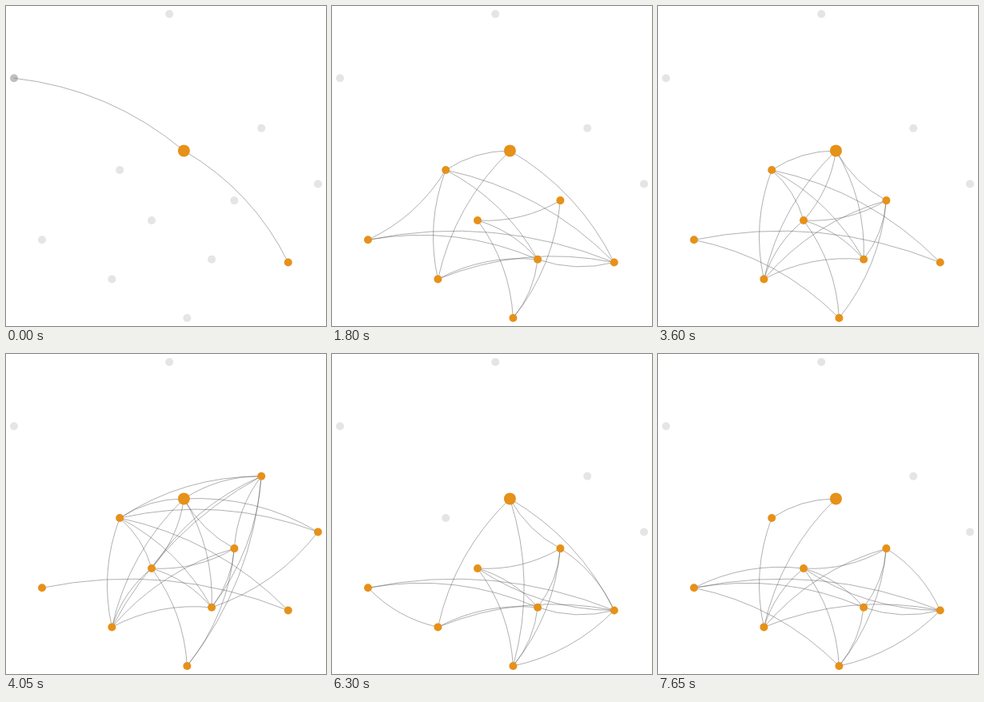
An HTML page with a canvas that plays this animation: 400 by 400 pixels, repeating every 8000 ms.

```html
<!DOCTYPE html>
<html lang="en">
<head>
<meta charset="utf-8">
<title>Network over time</title>
<style>
  html, body { margin: 0; width: 100%; height: 100%; overflow: hidden; background: #fff; }
  canvas { display: block; width: 400px; height: 400px; }
</style>
</head>
<body>
<canvas id="stage"></canvas>
<script>
const SIZE = 400, STEP = 450, LOOP = 8000;
const BEND = 0.15; // control point offset as a share of the chord

const nodes = {
  A: [204.2, 10], B: [10, 90.2], C: [319.2, 152.8], D: [222.4, 180.9],
  E: [142.2, 205], F: [390, 222.4], G: [285.4, 243.1], H: [182, 268],
  I: [45, 292.3], J: [257.1, 316.8], K: [352.7, 320.5], L: [132.4, 341.4],
  M: [226.4, 390]
};

// Each pair is an edge that bends to the left of its direction of travel.
const steps = [
  "BD DK",
  "DK KJ HJ KH",
  "LD LJ LK KJ HJ KH IJ IK HM JM",
  "LD LJ LK KJ HJ KH IJ IK HM JM GD GH GK GM IH",
  "ED DK EI LE LD EK EJ GH HJ HM GM IJ IK LJ LK KJ JM",
  "DK LD LE EJ GH HJ HM GM IJ IK LK KJ JM KM GK",
  "ED LE LD EK IH IK IJ HJ KH HM LK KJ JM",
  "LE LD EK IJ IK HJ HM GH GM LH LK KJ GD",
  "LE LD ED EK IK IM HJ HM GH GM GJ LH LJ LG GD DJ EJ EH DH",
  "EC DC HC LC GC CM CJ EJ EH EK EF DF ED DJ DH LD GD GH LG LH LJ LE IK FJ HJ HM GM GJ",
  "EC GC HC ED EJ EK LD GD GH HJ HM GM GJ IK LJ JM",
  "FC LD GH HJ KH HM IJ IK KJ GK GJ GM JM KM",
  "FC LD GH HJ KH HM IJ IK KJ GK GJ GM JM KM ED LE",
  "LD GH HJ KH HM IK KJ GK GJ GM JM KM ED LE",
  "LD GD DK DM GH GK GJ GM HJ KH HM IJ IK LI LJ LK KJ JM KM",
  "LD GD GH GK GJ GM HJ KH HM IJ IK LJ LK KJ JM KM",
  "LD GD DK EK GH GK GJ GM HJ KH HM IJ IK LJ LK KJ JM KM",
  "ED LE LD IH IK IJ IM GH LH LG LK GK GJ GM HJ KH HM KJ JM KM"
].map(s => s.split(" "));

const canvas = document.getElementById("stage");
const ctx = canvas.getContext("2d");
const ratio = window.devicePixelRatio || 1;
canvas.width = canvas.height = SIZE * ratio;
ctx.scale(ratio, ratio);

function drawEdge([from, to]) {
  const [x1, y1] = nodes[from], [x2, y2] = nodes[to];
  const dx = x2 - x1, dy = y2 - y1;
  ctx.beginPath();
  ctx.moveTo(x1, y1);
  ctx.quadraticCurveTo((x1 + x2) / 2 + dy * BEND, (y1 + y2) / 2 - dx * BEND, x2, y2);
  ctx.stroke();
}

function nodeColor(name, active) {
  if (!active) return "#e5e5e5";
  return name === "B" ? "rgba(128, 128, 128, 0.5)" : "#e69119";
}

function drawNode(name, active) {
  const [x, y] = nodes[name];
  ctx.fillStyle = nodeColor(name, active);
  ctx.beginPath();
  ctx.arc(x, y, name === "D" ? 7.5 : 5, 0, Math.PI * 2);
  ctx.fill();
}

function draw(time) {
  const edges = steps[Math.floor((time % LOOP) / STEP)];
  const linked = new Set("D" + edges.join(""));
  ctx.fillStyle = "#fff";
  ctx.fillRect(0, 0, SIZE, SIZE);
  ctx.strokeStyle = "rgba(80, 80, 80, 0.5)";
  ctx.lineWidth = 0.9;
  edges.forEach(drawEdge);
  for (const name in nodes) drawNode(name, linked.has(name));
}

const start = performance.now();
function tick() {
  draw(performance.now() - start);
  requestAnimationFrame(tick);
}
tick();
</script>
</body>
</html>
```
